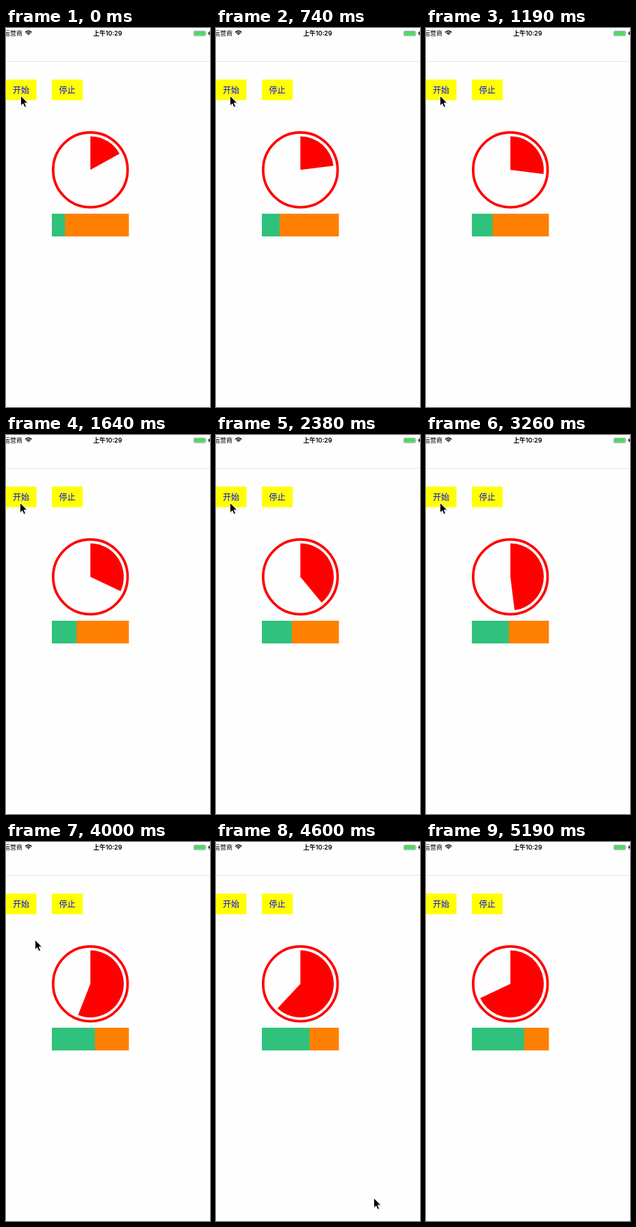
An HTML page for the animation above (5.29 s loop, 298 by 551 pixels).

```html
<!DOCTYPE html>
<html lang="zh">
<head>
<meta charset="utf-8">
<style>
  html, body { margin: 0; width: 100%; height: 100%; overflow: hidden; background: #fefefe; }
  svg { display: block; }
  text { font-family: Inter, "Noto Sans CJK SC", "Noto Sans CJK", sans-serif; text-anchor: middle; }
  .status { font-size: 9px; }
  .label { font-size: 12px; fill: #00f; }
</style>
</head>
<body>
<svg width="298" height="551" viewBox="0 0 298 551">
  <!-- Status bar -->
  <text class="status" x="10.5" y="11">运营商</text>
  <g fill="none" stroke="#000" stroke-width="1.5">
    <path d="M28.3 6.4Q32.8 2.2 37.3 6.4M30.1 8.2Q32.8 5.8 35.5 8.2"/>
    <path d="M31.3 9L32.8 10.6L34.3 9Q32.8 7.9 31.3 9Z" fill="#000" stroke="none"/>
  </g>
  <text class="status" x="148.5" y="11" font-weight="600">上午10:29</text>
  <rect x="274.4" y="4.4" width="17" height="7" rx="1.2" fill="#fff" stroke="#888" stroke-width=".7"/>
  <rect x="275" y="5" width="15.8" height="5.8" rx=".6" fill="#4cd964"/>
  <path d="M292.3 6.6q1.3 1.2 0 2.6z" fill="#777"/>
  <path d="M298 3.8L294.8 8.2H296.8L295.9 11.6L299.2 7.2H297.2Z"/>
  <path d="M0 48.5H298" stroke="#e4e4e4"/>

  <!-- Buttons -->
  <path d="M0 75H44.5V105H0ZM67 75H112V105H67Z" fill="#ff0"/>
  <text class="label" id="start" x="22" y="94.5">开始</text>
  <text class="label" x="89.5" y="94.5">停止</text>

  <!-- Progress -->
  <circle cx="123.25" cy="206.25" r="54.4" fill="none" stroke="#f00" stroke-width="3.75"/>
  <path id="pie" fill="#f00"/>
  <rect x="67" y="270" width="112.5" height="33" fill="#ff8000"/>
  <rect id="bar" x="67" y="270" height="33" fill="#30c27c"/>

  <g id="cursor">
    <path d="M.8 1.2V15.4L4 12.4L6.2 17.4L8.6 16.4L6.5 11.6H11.2Z" fill="#000" opacity=".18"/>
    <path d="M0 0V14.6L3.3 11.5L5.5 16.7L8.1 15.6L5.9 10.5H10.4Z"
      stroke="#fff" stroke-width="1" stroke-linejoin="round"/>
  </g>
</svg>
<script>
  const LOOP = 5290, TICK = 148.1;
  const $ = id => document.getElementById(id);
  const pie = $('pie'), bar = $('bar'), cursor = $('cursor'), start = $('start');

  function cursorAt(n) {
    if (n < 1) return [21.5, 98.5];
    if (n < 32) {
      const u = Math.min(1, Math.max(0, (n - 26) / 5));
      const e = u * u * (3 - 2 * u);
      return [20.5 + 210 * e, 98.5 + 419 * e];
    }
    if (n === 32) return [243, 536];
    if (n === 33) return [247, 544];
    return null;
  }

  function draw(now) {
    const n = Math.floor(now % LOOP / TICK);
    const value = Math.max(17, Math.floor(15.65 + 1.5 * n)) / 100;
    const angle = value * 2 * Math.PI, r = 48.75;
    const x = 123.25 + r * Math.sin(angle), y = 206.25 - r * Math.cos(angle);
    pie.setAttribute('d',
      `M123.25 206.25v${-r}A${r} ${r} 0 ${value > .5 ? 1 : 0} 1 ${x} ${y}Z`);
    bar.setAttribute('width', 112.5 * value);

    // The pressed label fades back in
    start.setAttribute('opacity', n === 1 ? .4 : n === 2 ? .75 : 1);

    const spot = cursorAt(n);
    cursor.setAttribute('visibility', spot ? 'visible' : 'hidden');
    if (spot) cursor.setAttribute('transform', `translate(${spot})`);
  }

  const t0 = performance.now();
  function frame() {
    draw(performance.now() - t0);
    requestAnimationFrame(frame);
  }
  frame();
</script>
</body>
</html>
```
